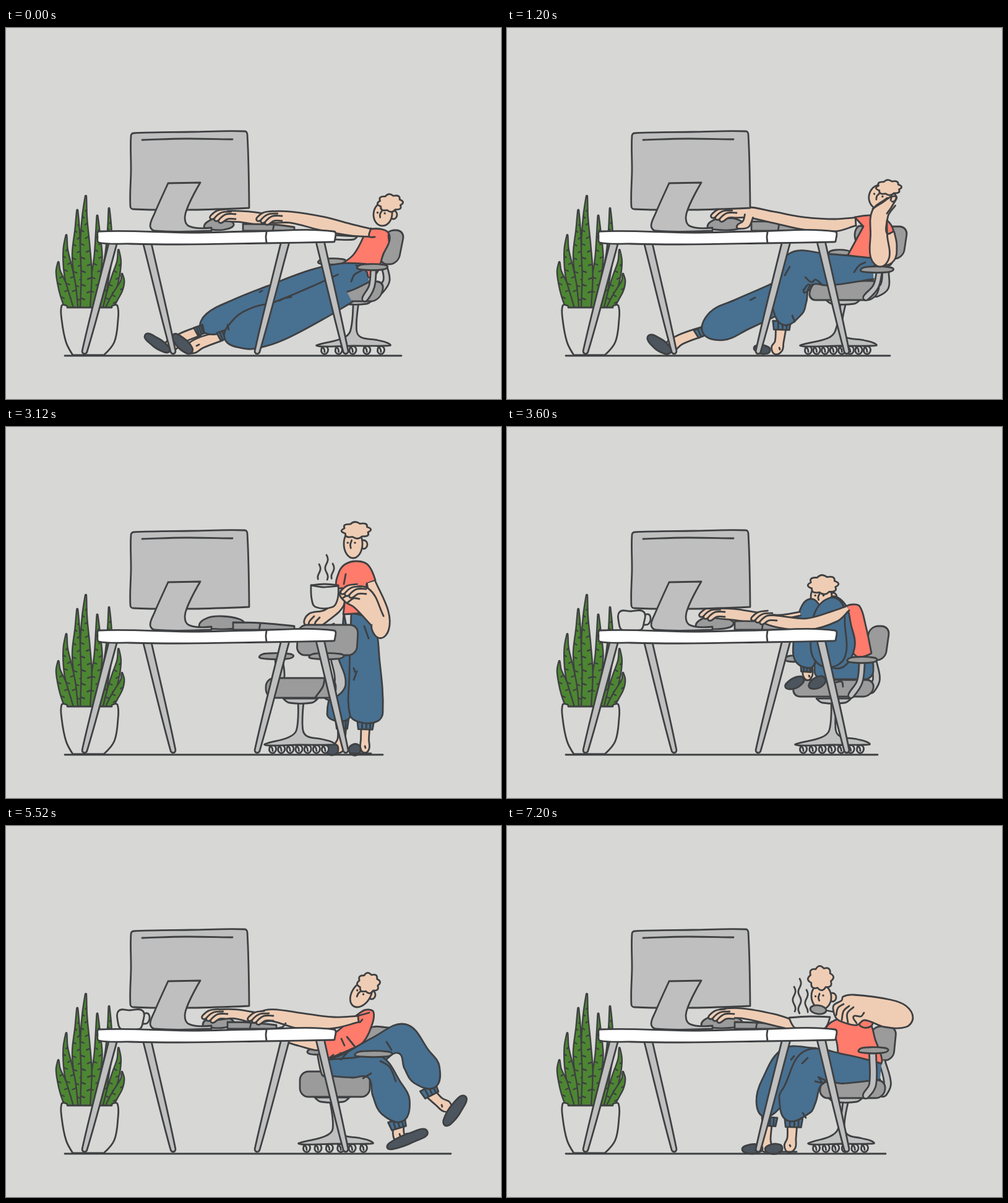
An HTML page with a canvas for the animation above (8.4 s loop, 800 by 600 pixels).

```html
<!DOCTYPE html>
<html lang="en">
<head>
<meta charset="utf-8">
<title>Ways to sit at a desk</title>
<style>
html, body { margin: 0; width: 100%; height: 100%; overflow: hidden; background: #d7d7d5; }
canvas { display: block; width: 800px; height: 600px; }
</style>
</head>
<body>
<canvas id="stage" width="800" height="600"></canvas>
<script>
const ctx = document.getElementById("stage").getContext("2d");
const HOLD = 1200;
const wall = "#d7d7d5", ink = "#3e4042", skin = "#efcdb4", jeans = "#487091", shirt = "#ff7b6b",
  grey = "#9b9b9b", pale = "#bfbfbf", shoe = "#4c555e", green = "#4d8632", white = "#fff";

// ---- Drawing tools ----

// "x,y" points; a trailing "!" makes a sharp corner.
const parse = text => text.trim().split(/\s+/).map(word => {
  const [x, y, w] = word.split(",").map(parseFloat);
  return { x, y, w, sharp: word.endsWith("!") };
});

// Smooth path whose handles scale with each segment, so short ones never overshoot.
function spline(pts, closed) {
  const n = pts.length, path = new Path2D();
  const at = i => closed ? pts[(i + n) % n] : pts[Math.max(0, Math.min(n - 1, i))];
  const handle = (i, reach) => {
    const p = at(i), dx = at(i + 1).x - at(i - 1).x, dy = at(i + 1).y - at(i - 1).y;
    const k = p.sharp ? 0 : reach / (Math.hypot(dx, dy) || 1);
    return [p.x + dx * k, p.y + dy * k];
  };
  path.moveTo(pts[0].x, pts[0].y);
  for (let i = 0; i < (closed ? n : n - 1); i++) {
    const a = at(i), b = at(i + 1), reach = Math.hypot(b.x - a.x, b.y - a.y) * .35;
    path.bezierCurveTo(...handle(i, reach), ...handle(i + 1, -reach), b.x, b.y);
  }
  return path;
}

function paint(fill, path) {
  ctx.fillStyle = fill;
  ctx.fill(path);
  ctx.stroke(path);
}
const shape = (fill, text) => paint(fill, spline(parse(text), true));
const lines = text => text.split("|").forEach(part => ctx.stroke(spline(parse(part), false)));

// Tube along "x,y,width" points: round at the first, open at the last.
function limb(fill, text) {
  const axis = parse(text), left = [], right = [];
  axis.forEach((p, i) => {
    const a = axis[Math.max(0, i - 1)], b = axis[Math.min(axis.length - 1, i + 1)];
    const len = Math.hypot(b.x - a.x, b.y - a.y);
    const ux = (b.x - a.x) / len * p.w / 2, uy = (b.y - a.y) / len * p.w / 2;
    left.unshift({ x: p.x - uy, y: p.y + ux });
    right.push({ x: p.x + uy, y: p.y - ux });
    if (i === 0) left.unshift({ x: p.x - ux, y: p.y - uy });
  });
  const tip = left.pop();
  left.push(tip);
  const end = left.findIndex(p => p === tip);
  const cap = left.splice(left.length - 2, 1)[0];
  paint(fill, spline([...left.slice(0, end), cap, ...right], false));
}

function oval(fill, x, y, rx, ry, tilt = 0) {
  const path = new Path2D();
  path.ellipse(x, y, rx, ry, tilt * Math.PI / 180, 0, 7);
  paint(fill, path);
}

function pad(fill, left, top, right, bottom, lean = 0) {
  const path = new Path2D(), w = right - left, h = bottom - top;
  path.roundRect(-w / 2, -h / 2, w, h, Math.min(14, h / 2));
  placed((left + right) / 2, (top + bottom) / 2, 0, () => {
    ctx.transform(1, 0, lean, 1, 0, 0);
    paint(fill, path);
  });
}

function placed(x, y, degrees, draw) {
  ctx.save();
  ctx.translate(x, y);
  ctx.rotate(degrees * Math.PI / 180);
  draw();
  ctx.restore();
}

// ---- Body parts ----

function head(x, y, rx, ry, tilt, hairX, hairY, hairW, hairH) {
  oval(skin, x + rx + 2, y + 1, 6, 7);
  placed(x, y, tilt, () => {
    oval(skin, 0, 0, rx, ry);
    lines(`${-rx * .15},${-ry * .25} ${-rx * .3},${ry * .05} ${-rx * .25},${ry * .3}`);
    ctx.fillStyle = ink;
    for (const eye of [-.58, .2]) {
      ctx.beginPath();
      ctx.arc(eye * rx, -ry * .08, 1.7, 0, 7);
      ctx.fill();
    }
  });
  const curls = new Path2D(), count = 8;
  for (let i = 0; i <= count; i++) {
    const spot = (turn, size) => [hairX + Math.cos(turn) * hairW * size, hairY + Math.sin(turn) * hairH * size];
    const turn = i / count * 2 * Math.PI + .3, step = Math.PI / count;
    if (i) curls.quadraticCurveTo(...spot(turn - step, 1.28), ...spot(turn, .86));
    else curls.moveTo(...spot(turn, .86));
  }
  paint(skin, curls);
}

// Three fingers reaching left from the wrist.
function hand(x, y) {
  for (let i = 0; i < 3; i++) {
    const fx = x + i * 7, fy = y + i * 3;
    limb(skin, `${fx + 3},${fy + 1},7 ${fx + 13},${fy - 6},8 ${fx + 27},${fy - 8 + i},8`);
  }
}

function cuff(x, y, degrees, w) {
  placed(x, y, degrees, () => {
    shape(jeans, `${-w / 2},-7! ${w / 2},-7! ${w / 2 - 2},7! ${2 - w / 2},7!`);
    for (const k of [-.2, .05, .28]) lines(`${w * k},-6 ${w * k},6`);
  });
}

function slipper(heelX, heelY, toeX, toeY, w = 14) {
  const len = Math.hypot(toeX - heelX, toeY - heelY);
  placed(heelX, heelY, Math.atan2(toeY - heelY, toeX - heelX) * 180 / Math.PI, () =>
    shape(shoe, `0,0 ${len * .12},${-w * .4} ${len * .6},${-w * .55} ${len},0 ${len * .6},${w * .5} ${len * .12},${w * .4}`));
}

// ---- Furniture ----

function leaf(tipX, tipY, w) {
  const baseX = 131 + (tipX - 131) * .6, height = 453 - tipY;
  const axis = k => tipX + (baseX - tipX) * k * k + Math.sin(k * 8 + tipX) * 1.5;
  const breadth = k => w * Math.min(1, .08 + k * 1.7) * (1 - k * .2);
  const stops = [.01, .2, .45, .7, 1];
  limb(green, stops.map(k => `${axis(k)},${tipY + k * height},${breadth(k)}`).join(" "));
  for (let y = tipY + 24, side = 1; y < 444; y += 11, side = -side) {
    const k = (y - tipY) / height, reach = side * breadth(k);
    lines(`${axis(k) + reach * .45},${y} ${axis(k) + reach * .12},${y + 2}`);
  }
}

function plant() {
  ctx.lineWidth = 2.4;
  for (const [x, y, w] of [[168, 290, 15], [114, 293, 18], [149, 302, 17], [97, 334, 18],
    [128, 270, 20], [182, 358, 16], [85, 378, 17], [188, 397, 14]]) leaf(x, y, w);
  ctx.lineWidth = 2.8;
  shape(wall, "90,449 98,449 99,452! 171,452! 172,449 180,449 181,472 175,508 158,529! 108,529! 97,508 90,472");
}

function monitor() {
  shape(pale, "202,174 206,170 300,168 386,167 390,172 393,291! 300,294 206,293 201,289 202,230");
  lines("220,181 290,179 366,180");
  shape(pale, "262,251! 314,250! 290,300 295,320 332,323! 332,328! 240,328 233,320 240,300");
}

function mug() {
  lines("221,304 229,303 232,311 228,319 221,320");
  shape(wall, "182,299 200,298 221,299 221,318 216,328 186,328 181,318");
}

function desk() {
  for (const [top, foot] of [[173, 127], [228, 270], [451, 406], [508, 549]]) limb(pale, `${foot},523,8 ${top},347,13`);
  shape(white, "150,329 300,331 400,329 530,329 531,345 528,346 420,348 280,350 200,349 150,347 148,338");
  lines("421,330 420,338 421,347");
}

function chairBase(topX, left, right, wheels) {
  const cx = (left + right) / 2, gap = (right - left - 28) / (wheels - 1);
  for (let i = 0; i < wheels; i++) {
    const x = left + 13 + gap * i;
    oval(wall, x, 521, 5.5, 6.5, 12);
    lines(`${x - 5},515 ${x - 1},519 ${x},524`);
  }
  shape(pale, `${topX - 4},444! ${topX + 5},444! ${cx + 5},488 ${cx + 12},500 ${right - 20},505 ${right},512
    ${right - 10},514 ${cx},514 ${left + 6},515 ${left},513 ${cx - 18},502 ${cx - 5},490`);
  shape(pale, `${topX - 28},439! ${topX - 18},446 ${topX + 18},446 ${topX + 28},439!`);
}

const armrest = (x, y, w) =>
  shape(grey, `${x - w / 2},${y} ${x - w * .2},${y - 5} ${x + w * .4},${y - 4} ${x + w / 2},${y} ${x + w * .3},${y + 4} ${x - w * .3},${y + 4}`);

const mouse = (left, right) =>
  shape(grey, `${left},321 ${left + 13},309 ${(left + right) / 2},306 ${right - 7},311 ${right},319 ${right - 15},326 ${left + 12},326`);

function keyboard(left, split, right, top) {
  shape(grey, `${left},${top}! ${split},${top + 1} ${right},322! ${right},328! ${left},328!`);
  lines(`${split},${top + 2} ${split - 2},328`);
}

function steam(x, top, bottom) {
  const wave = [];
  for (let y = top; y <= bottom; y += 4) wave.push(`${x + Math.sin((y - top) / 4.5) * 2.2},${y}`);
  lines(wave.join(" "));
}

// ---- Poses ----

function reclined() {
  chairBase(565, 502, 621, 5);
  pad(grey, 608, 327, 639, 382, -.2);
  limb(pale, "604,425,11 615,408,10 611,384,9");
  pad(grey, 541, 410, 608, 442, -.3);
  armrest(527, 378, 45);
  shape(shirt, "589,325! 605,325 617,330 620,343 611,363 590,403 543,381! 562,366 578,337!");
  limb(skin, "300,518,18 315,509,18 348,498,15");
  limb(skin, "264,515,18 285,501,16 312,490,15");
  slipper(264, 523, 225, 496);
  slipper(300, 525, 270, 496, 16);
  limb(jeans, "331,479,36 375,459,42 430,438,44 500,413,46 550,403,46 584,396,30");
  cuff(313, 489, -20, 15);
  cuff(351, 497, -20, 17);
  limb(jeans, "378,494,52 410,483,66 445,472,62 500,446,56 548,421,50");
  lines("558,410 563,399 575,392 | 566,384 582,393 585,402 | 442,441 450,437 461,435 | 410,427 414,425 | 360,488 358,480 | 308,514 312,512");
  limb(pale, "580,438,9 591,418,9 594,390,9");
  armrest(592, 387, 49);
  mouse(320, 368);
  limb(skin, "345,304,14 380,305,18 420,311,20 460,323,16");
  hand(330, 305);
  keyboard(383, 433, 466, 317);
  limb(skin, "425,306,17 460,306,18 510,316,22 560,327,18 588,331,13");
  hand(405, 308);
  lines("590,324 587,337 596,338 | 531,335 565,337 | 531,342 562,342 568,337 | 618,335 619,345");
  head(609, 301, 15, 19, 6, 621, 283, 20, 14);
}

function slouched() {
  chairBase(543, 474, 597, 8);
  pad(grey, 601, 321, 644, 373, -.15);
  oval(grey, 571, 335, 9, 15);
  limb(pale, "596,428,14 610,418,14 612,394,10");
  pad(grey, 490, 409, 600, 440, -.3);
  armrest(537, 364, 35);
  shape(shirt, "562,306! 590,303 612,309 625,330 622,380 600,386 551,367! 576,321!");
  limb(skin, "262,517,18 280,504,16 318,490,15");
  slipper(264, 525, 228, 498, 17);
  limb(skin, "436,519,18 440,508,14 443,482,17");
  slipper(425, 522, 399, 517, 13);
  cuff(315, 491, -25, 22);
  limb(jeans, "339,482,50 380,463,52 430,440,50 460,424,48");
  cuff(444, 481, 2, 29);
  limb(jeans, "453,456,50 458,435,54 473,391,62 520,391,51 592,389,34");
  lines("479,425 487,415 491,420 481,428 479,423 | 482,403 492,411 499,407 510,416 | 561,395 569,384 579,379 | 449,400 457,386 | 393,440 401,436 | 465,475 461,465 | 440,517 441,520");
  limb(pale, "580,436,9 596,418,9 602,394,9");
  armrest(598, 391, 53);
  mouse(324, 383);
  keyboard(395, 440, 487, 313);
  limb(skin, "350,301,13 388,298,17 430,306,18 480,316,20 530,319,20 563,313,13");
  limb(skin, "375,321,8 386,317,13 391,304,14");
  hand(330, 303);
  lines("563,306 564,320");
  head(603, 273, 18, 20, 18, 617, 258, 20, 12);
  limb(skin, "613,370,28 622,350,16 619,331,14");
  limb(skin, "603,371,30 601,335,27 603,300,27 621,281,18");
  lines("591,292 604,284 628,272 623,287 614,300 | 614,311 614,332 625,329");
}

function standing() {
  limb(skin, "538,519,17 542,505,12 543,482,14");
  limb(skin, "580,520,14 580,505,13 581,483,14");
  slipper(537, 521, 516, 521, 17);
  slipper(573, 522, 554, 521, 17);
  lines("556,528 590,528");
  cuff(543, 481, 0, 21);
  cuff(581, 482, 2, 27);
  shape(jeans, "546,301! 558,380 556,468 537,476 519,464 536,390");
  shape(jeans, "558,301! 592,315 604,380 609,462 600,476 575,478 556,466 555,400");
  lines("562,409 567,395 | 564,396 562,390 | 579,322 586,342 | 580,516 581,519");
  limb(skin, "494,314,25 520,303,17 538,285,17 542,258,14");
  lines("489,325 490,315 498,306 | 498,326 500,316 507,308 | 518,324 530,318");
  shape(shirt, "534,260 538,235 548,222 567,217 585,223 597,248! 583,253! 576,301! 545,303! 546,262");
  limb(skin, "605,328,27 605,300,26 590,251,14");
  limb(skin, "551,271,24 575,277,38 600,313,25");
  lines("545,264 553,262 558,266 | 545,276 555,270 | 552,284 562,277 571,278 | 549,238 546,254");
  head(561, 189, 15, 23, 0, 566, 167, 23, 13);
  for (const [x, top] of [[506, 222], [518, 207], [528, 221]]) steam(x, top, 248);
  shape(wall, "493,256! 515,254 537,256! 536,278 528,291 500,291 494,278");
  lines("493,256 512,259 537,257");
  hand(541, 266);
  chairBase(476, 418, 531, 7);
  limb(pale, "444,404,12 441,375,12");
  limb(pale, "523,432,20 540,415,18 531,374,12");
  pad(grey, 420, 406, 533, 438);
  lines("500,437 512,420 515,407");
  pad(grey, 471, 320, 568, 369, -.06);
  armrest(437, 371, 55);
  armrest(518, 371, 56);
  mouse(312, 385);
  keyboard(367, 411, 466, 316);
}

function crouched() {
  chairBase(528, 466, 586, 7);
  pad(grey, 582, 322, 615, 377, -.14);
  limb(pale, "588,425,12 597,408,11 592,378,10");
  pad(grey, 463, 409, 592, 436, -.2);
  armrest(463, 375, 28);
  pad(jeans, 497, 372, 592, 408);
  shape(shirt, "548,292 558,287 570,290 579,318 589,366! 565,371 554,345");
  limb(skin, "486,402,15 486,387,15");
  slipper(479, 407, 450, 421, 15);
  slipper(514, 407, 488, 420, 16);
  cuff(484, 389, 4, 20);
  lines("488,402 489,404 | 532,413 541,412 543,420");
  head(508, 274, 17, 19, 0, 511, 255, 24, 15);
  shape(jeans, "490,278 508,300 496,385 468,381 463,345 470,305");
  shape(jeans, "523,276 546,286 556,320 562,355 545,387 520,385 505,340");
  shape(jeans, "523,276 542,286 546,318 546,372 520,389 496,375 491,340 499,297");
  mouse(305, 366);
  limb(skin, "330,301,13 365,303,18 410,309,16 440,308,8 474,302,6");
  hand(311, 303);
  keyboard(368, 414, 457, 314);
  limb(skin, "410,308,13 440,315,19 485,319,19 530,306,18 551,293,8");
  hand(395, 309);
  limb(pale, "556,434,9 570,412,9 574,379,9");
  armrest(574, 377, 48);
}

function legsOut() {
  chairBase(527, 473, 593, 6);
  shape(grey, "570,350 588,327 608,325 630,333 612,347 585,362");
  pad(grey, 475, 397, 588, 438);
  limb(pale, "515,400,10 508,365,11");
  armrest(500, 365, 26);
  shape(skin, "455,347 475,356 512,362 530,345");
  shape(shirt, "519,377! 508,350 530,336 575,300 586,297 594,301 592,320 577,350 555,362");
  limb(skin, "712,454,18 700,446,15 684,430,18");
  slipper(709, 484, 742, 437, 17);
  cuff(685, 429, -27, 28);
  limb(jeans, "680,402,49 664,378,49 640,344,48 600,362,42 550,382,28 520,389,22");
  limb(skin, "648,505,15 636,503,18 634,482,18");
  slipper(616, 520, 681, 494, 15);
  cuff(633, 482, -17, 28);
  limb(jeans, "630,455,50 615,425,50 596,390,40 560,391,32 520,391,26");
  lines("605,380 620,390 630,413 | 615,349 623,362 | 577,408 590,400 | 704,451 705,454 | 636,498 637,501 | 519,378 529,370 | 529,376 541,367 | 541,378 552,366 | 542,344 547,355 | 551,341 564,357");
  armrest(594, 369, 60);
  mouse(318, 368);
  limb(skin, "335,306,15 370,304,15 415,314,20");
  hand(317, 308);
  keyboard(358, 396, 437, 317);
  limb(skin, "410,309,16 430,306,19 480,316,26 530,318,18 570,312,10");
  hand(391, 311);
  lines("437,327 447,325 452,319 | 569,307 587,302 | 569,307 571,317 576,313");
  head(574, 272, 15, 23, 33, 586, 254, 18, 16);
}

function kneeling() {
  chairBase(520, 465, 579, 6);
  limb(skin, "664,359,19 652,361,13 632,364,12");
  slipper(661, 390, 674, 344, 17);
  limb(skin, "659,406,20 648,400,14 632,396,14");
  slipper(640, 442, 683, 395, 18);
  cuff(633, 364, -85, 18);
  cuff(635, 395, -82, 21);
  shape(jeans, "556,318! 575,317! 575,345 566,372 595,350 622,344 631,364 627,385 632,402 622,420 600,424 530,412 480,408 474,394 485,375 545,366");
  lines("565,377 580,368 600,362 613,362 | 615,361 627,369 | 619,408 629,398 | 657,357 660,358 | 657,400 661,402");
  pad(grey, 460, 410, 581, 441);
  armrest(472, 372, 25);
  limb(pale, "490,431,22 493,405,20 512,370,18");
  shape(grey, "465,345 490,345 520,324 545,316 556,321 560,340 556,364 540,370 475,368 464,358");
  limb(skin, "470,305,12 492,291,14 509,281,12");
  shape(shirt, "503,277! 513,260 524,251 543,250 555,256 565,278 575,318! 550,319 525,310 523,275 514,286!");
  mouse(330, 388);
  limb(skin, "350,301,13 390,296,19 425,298,20 450,312,20");
  limb(skin, "381,321,8 388,313,13 400,306,16");
  hand(335, 302);
  lines("300,322 333,323");
  keyboard(388, 435, 471, 315);
  limb(skin, "437,305,18 470,310,19 510,315,25 539,302,23 551,276,8");
  hand(420, 308);
  lines("546,276 547,265 | 547,277 554,273 555,260");
  head(527, 217, 14, 21, -3, 525, 201, 22, 14);
  limb(pale, "554,440,9 570,412,9 575,374,9");
  armrest(578, 371, 56);
}

function eating() {
  chairBase(547, 487, 593, 6);
  pad(grey, 587, 324, 627, 379, -.1);
  limb(pale, "608,432,12 615,416,11 606,380,10");
  pad(grey, 506, 411, 611, 440, -.1);
  shape(shirt, "515,328 540,310 565,309 586,318 595,345 606,378 600,388 535,371! 530,340");
  limb(skin, "418,519,17 420,505,12 422,478,13");
  limb(skin, "457,519,18 460,505,14 461,480,16");
  slipper(413, 521, 380, 523, 14);
  slipper(445, 521, 417, 523, 15);
  cuff(424, 478, 4, 25);
  cuff(463, 480, 2, 29);
  limb(jeans, "421,452,38 432,420,44 458,380,46 500,378,38");
  limb(jeans, "465,451,56 473,435,57 496,390,60 545,393,47 604,397,26");
  lines("498,413 514,414 503,406 | 505,409 511,417 | 477,384 486,375 | 459,378 464,372 | 483,472 478,464 | 457,516 458,518 | 440,527 468,527");
  for (const [x, top] of [[464, 260], [473, 247], [484, 265]]) steam(x, top, 303);
  mouse(314, 380);
  keyboard(368, 404, 455, 317);
  limb(skin, "345,303,13 380,303,16 430,313,18 462,322,16");
  hand(326, 308);
  shape(wall, "456,310! 490,308 522,309! 517,323 510,329 470,329 462,323");
  head(508, 276, 16, 20, -6, 507, 246, 20, 19);
  lines("515,298 535,302");
  oval(grey, 503, 297, 13, 7, 8);
  shape(shirt, "570,322 578,310 589,309 588,324");
  shape(skin, "528,301 528,290 541,282 543,276 560,273 620,281 645,291 656,310 645,325 610,325 578,314 565,322 545,318 533,312");
  lines("532,306 535,294 544,288 | 541,314 544,299 553,291 | 551,318 550,303 560,293 | 565,319 560,308 572,308 577,302");
  limb(pale, "580,436,10 591,418,11 591,366,11");
  armrest(592, 363, 48);
}

// Each pose, where the floor line ends, and whether the mug stands on the desk.
const scenes = [
  [reclined, 639], [slouched, 619], [standing, 609], [crouched, 599, true],
  [legsOut, 719, true], [kneeling, 659, true], [eating, 612]
];

function render() {
  const [pose, floorEnd, hasMug] = scenes[Math.floor(performance.now() / HOLD) % scenes.length];
  ctx.fillStyle = wall;
  ctx.fillRect(0, 0, 800, 600);
  ctx.strokeStyle = ink;
  ctx.lineWidth = 2.8;
  ctx.lineCap = ctx.lineJoin = "round";
  plant();
  pose();
  monitor();
  if (hasMug) mug();
  desk();
  lines(`95,530 ${floorEnd},530`);
  requestAnimationFrame(render);
}
render();
</script>
</body>
</html>
```
